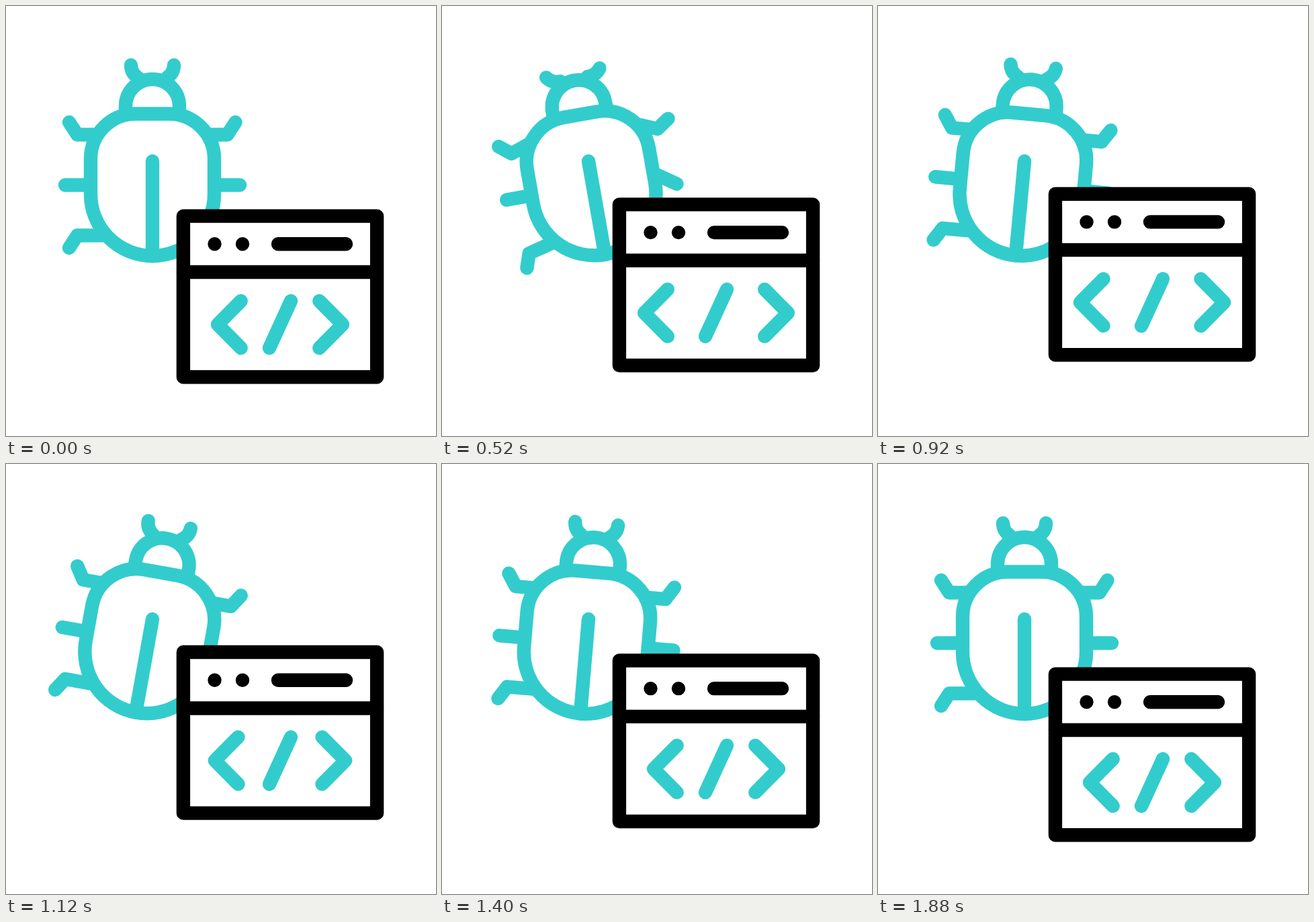
Animation, 640 px wide and 640 px high, one loop 2 s. Source, as an HTML page:

```html
<!DOCTYPE html>
<html lang="en">
<head>
<meta charset="utf-8">
<title>Bug and code window</title>
<style>
  html, body { margin: 0; width: 100%; height: 100%; overflow: hidden; background: #fff; }
  svg { display: block; width: 100%; height: 100%; }
  g { fill: none; stroke-width: 20.4; stroke-linecap: round; stroke-linejoin: round; }
  .teal { stroke: #33cccc; }
  .black { stroke: #000; }
</style>
</head>
<body>
<svg viewBox="0 0 640 640">
  <g id="bug" class="teal">
    <path id="feelerL" d="M186 88Q186 100 197 107"/>
    <path id="feelerR" d="M250 88Q250 100 239 107"/>
    <path id="legUL" d="M94 173L106 191.5H132"/>
    <path id="legUR" d="M341.5 173L329.5 191.5H304"/>
    <path d="M88 266.5H124"/>
    <path id="legMR" d="M348 266.5H312"/>
    <path id="legBL" d="M94 360L106 341.5H143"/>
    <path d="M178 160V149a40 40 0 0 1 80 0V160"/>
    <path d="M193 160.500H243A67 67 0 0 1 310 227V280A92 92 0 0 1 126 280V227A67 67 0 0 1 193 160.500Z"/>
    <path d="M218 231V372"/>
  </g>
  <g id="win" class="black">
    <rect x="263.9" y="312.600" width="288.200" height="239.600" fill="#fff"/>
    <path d="M264 396H552M310.500 354.300h.01M352 354.300h.01M405 354.300H506"/>
    <g class="teal">
      <path id="less" d="M349.700 439L315 474L349.700 509"/>
      <path d="M424 439L392 509"/>
      <path id="more" d="M466.300 439L501 474L466.300 509"/>
    </g>
  </g>
</svg>
<script>
const LOOP = 2000, STEP = 40;

// Ease in and out: cubic bezier (0.5, 0, 0.45, 1), solved for x by bisection
function ease(x) {
  let lo = 0, hi = 1, s = 0.5;
  for (let i = 0; i < 20; i++) {
    s = (lo + hi) / 2;
    const r = 1 - s;
    if (1.5 * s * r * r + 1.35 * s * s * r + s * s * s < x) lo = s; else hi = s;
  }
  return s * s * (3 - 2 * s);
}

// Eased value at time t along [time, value] keys
function track(t, keys) {
  if (t <= keys[0][0]) return keys[0][1];
  for (let i = 1; i < keys.length; i++) {
    const [t0, a] = keys[i - 1], [t1, b] = keys[i];
    if (t < t1) return a + (b - a) * ease((t - t0) / (t1 - t0));
  }
  return keys[keys.length - 1][1];
}

const turn = [[80, 0], [510, -10], [595, -10], [1120, 10.2], [1690, 0]];
const lift = [[85, 0], [970, -33], [1040, -33], [1880, 0]];
const spread = [[80, 0], [740, 16.8], [1360, 0]];
const legSwing = [[80, 0], [485, 1], [560, 1], [970, 0]];
const feelerSwing = [[80, 0], [560, 35], [600, 35], [1080, 0]];

// id, pivot x, pivot y, full swing in degrees
const legs = [
  ["legUL", 132, 191.5, -19],
  ["legUR", 304, 191.5, 23],
  ["legMR", 312, 266.5, 35],
  ["legBL", 143, 341.5, -14.5]
];

const set = (id, value) => document.getElementById(id).setAttribute("transform", value);
const rotate = (id, deg, x, y) => set(id, `rotate(${deg} ${x} ${y})`);
const move = (id, x, y) => set(id, `translate(${x} ${y})`);

function draw(t) {
  rotate("bug", track(t, turn), 218, 231);
  const swing = track(t, legSwing);
  for (const [id, x, y, deg] of legs) rotate(id, deg * swing, x, y);
  const feeler = track(t, feelerSwing);
  rotate("feelerL", -feeler, 197, 106);
  rotate("feelerR", feeler, 239, 106);
  move("win", 0, track(t, lift));
  const gap = track(t, spread);
  move("less", -gap, 0);
  move("more", gap, 0);
}

const start = performance.now();
function tick() {
  const t = (performance.now() - start) % LOOP;
  draw(Math.floor(t / STEP) * STEP);
  requestAnimationFrame(tick);
}
tick();
</script>
</body>
</html>
```
